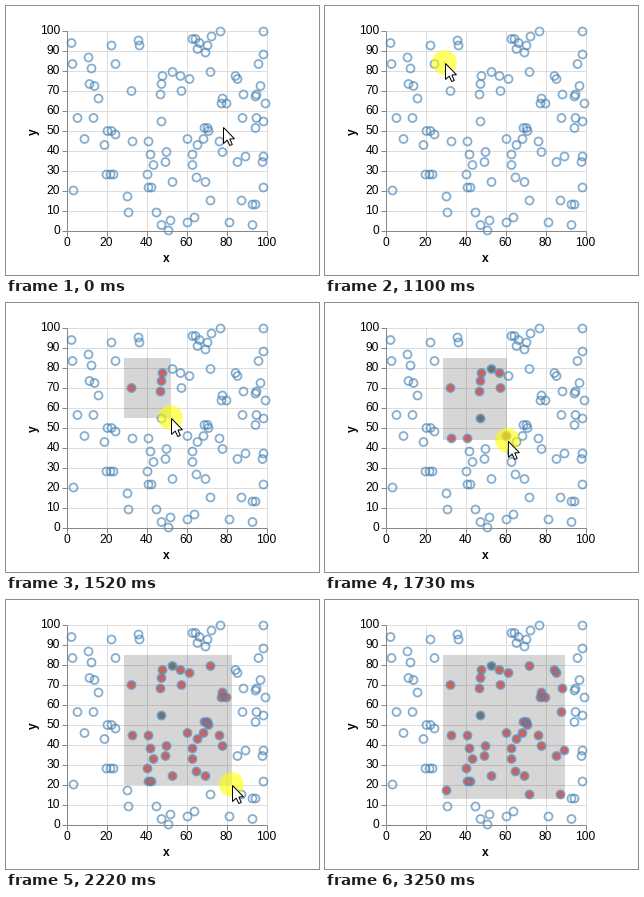
Animation of 313 by 269 pixels, one loop 4.11 s. Source, as a matplotlib script:

```python
import numpy as np
import matplotlib.pyplot as plt
from matplotlib.animation import FuncAnimation
from matplotlib.patches import Circle, Polygon, Rectangle

WIDTH, HEIGHT, DPI = 313, 269, 100
PX = 72 / DPI  # points per pixel
LOOP, TICK = 4110, 10

LEFT, TOP, SIZE = 60, 24, 200
RIGHT, BOTTOM = LEFT + SIZE, TOP + SIZE
BRUSH_START = np.array([117, 54])

# Scatter data in stage pixels, grouped by height: y -> x positions
ROWS = {
    25: [214, 257], 30: [205], 32.5: [186, 189], 34: [132], 36.5: [65, 193],
    39: [105, 133, 201], 42.5: [191], 46: [199], 48: [257], 51: [82],
    57.5: [66, 109, 252], 62: [85], 65.5: [166, 204], 69.5: [156, 174, 229],
    72.5: [183, 231], 77.5: [83, 155], 79.5: [88, 254], 84.5: [125, 175],
    88: [154, 237, 250], 90: [249], 92: [92, 216], 97: [215, 220, 259],
    111.5: [71, 87, 236, 250], 115: [155, 257], 121.5: [198, 201, 249],
    124.5: [101, 105, 202], 128: [109], 132.5: [78, 181, 197],
    135: [126, 142, 213], 138.5: [98, 191], 145.5: [160, 216],
    148: [144, 186], 150: [239, 257], 155.5: [159, 231, 256],
    158.5: [147, 186], 168: [100, 104, 107, 141], 171: [190],
    175.5: [166, 199], 181: [142, 145, 257], 184: [67], 190: [121],
    194: [204, 235], 198: [246, 249], 206: [122, 150], 211: [188],
    214: [164], 216: [181, 223], 218.5: [155, 246], 224: [162],
}
points = np.array([(x, y) for y, xs in ROWS.items() for x in xs])
GREY_POINTS = {(155, 115), (166, 65.5)}
fills = np.array(["#6f7472" if tuple(p) in GREY_POINTS else "#d25f59"
                  for p in points])

# Pointer path: time, x, y
PATH = np.array([
    (0, 217, 121), (490, 132, 68), (560, 122, 60), (630, 119, 57),
    (700, 118, 56), (770, 118, 55), (960, 118, 55), (1100, 120, 57),
    (1520, 165, 115), (1660, 174.5, 127.5), (1940, 208, 169),
    (2220, 226, 185), (2430, 240, 199), (2830, 240, 199),
    (3050, 244, 207), (3180, 261, 236),
])
STEPS = np.array([*range(0, 771, 70), *range(960, 2431, 70),
                  2830, 3050, 3110, 3180, 3250])
PRESS, DRAG, RELEASE, LEAVE = 960, 1100, 2830, 3250

ARROW = np.array([(0, 0), (0, 16), (3.7, 12.6), (6.3, 18), (8.8, 17),
                  (6.4, 11.5), (11, 11.3)])

fig = plt.figure(figsize=(WIDTH / DPI, HEIGHT / DPI), dpi=DPI, facecolor="white")
ax = fig.add_axes([0, 0, 1, 1])
ax.set_xlim(-0.5, WIDTH - 0.5)
ax.set_ylim(HEIGHT - 0.5, -0.5)
ax.axis("off")


def label(x, y, text, **style):
    ax.text(x, y, text, fontname="Liberation Sans", fontsize=12 * PX,
            color="black", **style)


def draw_axes():
    line = dict(linewidth=PX, zorder=1)
    xs = np.arange(LEFT, RIGHT + 1, 40)
    ys = np.arange(TOP, BOTTOM + 1, 20)
    ax.vlines(xs, TOP, BOTTOM, color="#dddddd", **line)
    ax.hlines(ys, LEFT, RIGHT, color="#dddddd", **line)
    ax.vlines(xs, BOTTOM, BOTTOM + 5, color="#888888", **line)
    ax.hlines(ys, LEFT - 5, LEFT, color="#888888", **line)
    ax.vlines(LEFT, TOP, BOTTOM, color="#888888", **line)
    ax.hlines(BOTTOM, LEFT, RIGHT, color="#888888", **line)
    for x in xs:
        label(x, 240, str((x - LEFT) // 2), ha="center", va="baseline")
    for y in ys:
        label(53.5, y + 4, str((BOTTOM - y) // 2), ha="right", va="baseline")
    label(160, 255, "x", ha="center", va="baseline", weight="bold")
    label(27, 125, "y", ha="center", va="center", rotation=90, weight="bold")


draw_axes()
brush = ax.add_patch(Rectangle(BRUSH_START, 0, 0, facecolor="#333333",
                               alpha=0.2, linewidth=0, zorder=2))
dots = ax.scatter([], [], s=(7 * PX) ** 2, linewidths=0, zorder=3)
ax.scatter(*points.T, s=(8 * PX) ** 2, facecolors="none",
           edgecolors=(0.275, 0.51, 0.706, 0.65), linewidths=1.8 * PX, zorder=4)
halo = ax.add_patch(Circle((0, 0), 12.3, facecolor="#ffff00", alpha=0.6,
                           linewidth=0, zorder=5))
pointer = ax.add_patch(Polygon(ARROW, facecolor="white", edgecolor="black",
                               linewidth=PX, joinstyle="miter", zorder=6))


def draw(frame):
    now = frame * TICK
    time = STEPS[STEPS <= now][-1]
    tip = np.array([np.interp(time, PATH[:, 0], PATH[:, k]) for k in (1, 2)])
    pointer.set_xy(tip + ARROW)
    pointer.set_visible(time < LEAVE)
    halo.center = tip - 1
    halo.set_visible(PRESS <= time < RELEASE)

    # The brush keeps its last corner after the button is released
    end = (tip if time < RELEASE else PATH[-3, 1:]) - 1
    active = time >= DRAG
    brush.set_visible(active)
    brush.set_width(end[0] - BRUSH_START[0])
    brush.set_height(end[1] - BRUSH_START[1])
    chosen = active & np.all((points >= BRUSH_START) & (points <= end), axis=1)
    dots.set_offsets(points[chosen])
    dots.set_facecolors(list(fills[chosen]))
    return brush, dots, halo, pointer


anim = FuncAnimation(fig, draw, frames=LOOP // TICK, interval=TICK,
                     repeat=True, repeat_delay=0)
plt.show()
```
